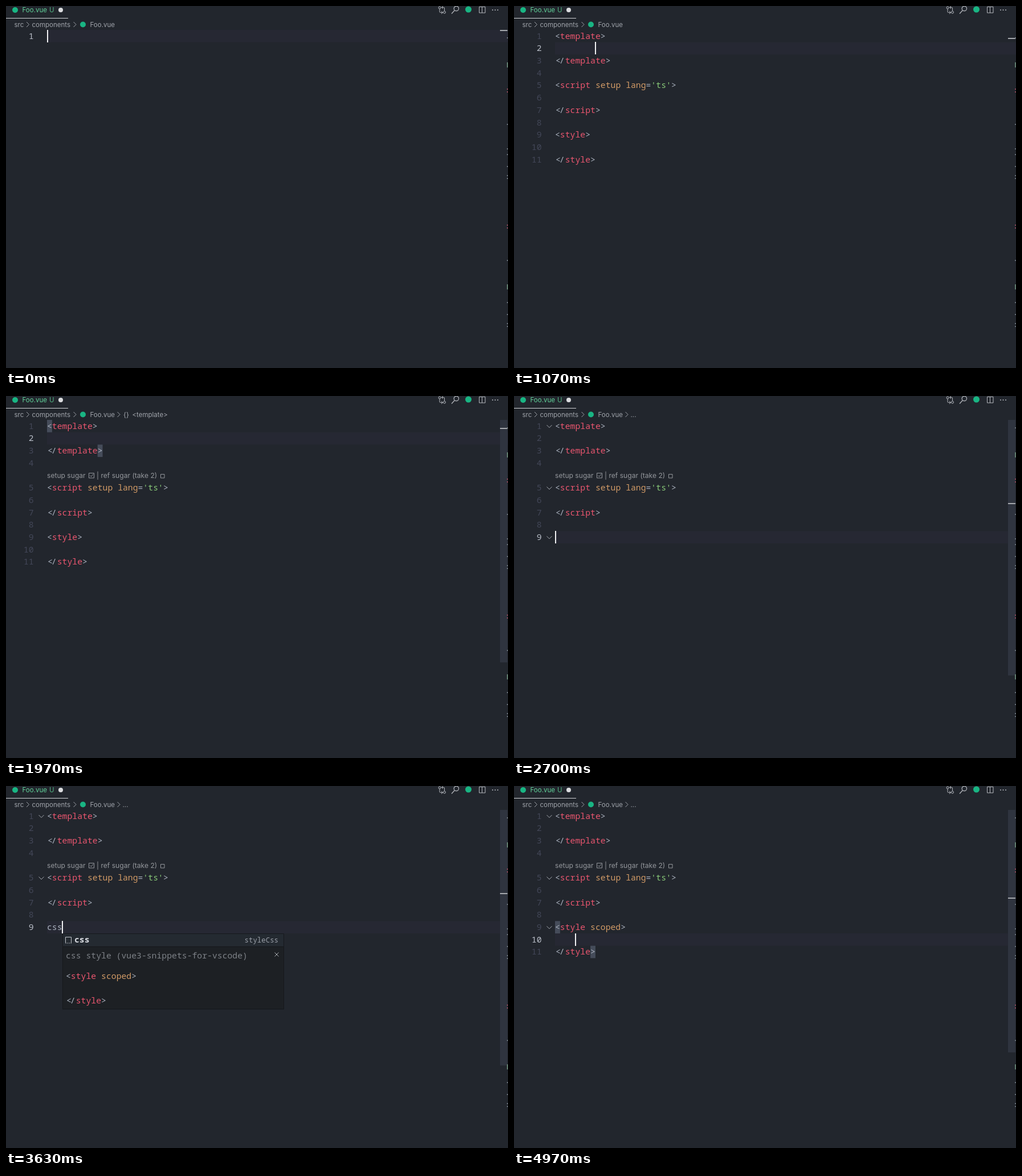
An HTML page with a canvas for the animation above (5.01 s loop, 881 by 636 pixels).

```html
<!DOCTYPE html>
<html lang="en">
<head>
<meta charset="utf-8">
<title>Editor snippets</title>
<style>
html, body { margin: 0; width: 100%; height: 100%; overflow: hidden; background: #22262d; }
canvas { display: block; }
</style>
</head>
<body>
<canvas id="stage" width="881" height="636"></canvas>
<script>
const ctx = document.getElementById('stage').getContext('2d');
const LOOP = 5010, LEFT = 72, TOP = 42, ROW = 21.7, CHAR = 8.868;
const MONO = '"Noto Sans Mono", "Noto Sans CJK SC", "Noto Sans CJK", monospace';
const UI = 'Inter, sans-serif';
const code = '14.78px ' + MONO, bold = 'bold ' + code;
const FG = '#abb2bf', RED = '#ea566f', ORANGE = '#d19a66', GREEN = '#89ca78', VUE = '#19b583';
const ICON = '#b4b7bd';

const head = ['<template>', '', '</template>', '', "<script setup lang='ts'>", '', '<\/script>', ''];
const file = [...head, '<style>', '', '</style>'];
const scoped = [...head, '<style scoped>', '', '</style>'];

// Notes are [x offset, text, row].
const initPopup = {
  items: ['vueinit'], match: 0, label: 'vinit',
  notes: [[0, 'vue模版初始化(默认setup语法糖和ts)', 0], [274, '(vue3-sni', 0], [0, 'ppets-for-vscode)', 1]],
  body: file
};
const listPopup = {
  items: 'c canvas cap caption cc:ie cc:noie center cite cmd code col colg'.split(' '), match: 1
};
const cssPopup = {
  items: ['css'], match: 3, label: 'styleCss',
  notes: [[0, 'css style (vue3-snippets-for-vscode)', 0]],
  body: scoped.slice(8)
};

// Each step changes some of the editor's state from its time on.
const steps = [
  [0, { lines: [''], row: 1, col: 0, mark: 43, brackets: [], folds: [] }],
  [280, { lines: ['v'], col: 1 }],
  [450, { lines: ['vu'], col: 2, popup: initPopup }],
  [980, { lines: file, row: 2, col: 8, mark: 57, popup: null }],
  [1300, { brackets: [[1, 0], [3, 10]] }],
  [1700, { lens: true, crumb: '<template>', slider: 468 }],
  [2250, { folds: [1, 5, 9] }],
  [2600, { lines: [...head, ''], row: 9, col: 0, mark: 189, brackets: [], crumb: '...', slider: 491 }],
  [3100, { lines: [...head, 'c'], col: 1, popup: listPopup }],
  [3380, { lines: [...head, 'cs'], col: 2, popup: { ...cssPopup, match: 2 } }],
  [3560, { lines: [...head, 'css'], col: 3, folds: [1, 5], popup: cssPopup }],
  [4520, { lines: scoped, row: 10, col: 4, mark: 197, slider: 468, popup: null }],
  [4850, { brackets: [[9, 0], [11, 7]], folds: [1, 5, 9] }]
];

function stateAt(t) {
  const s = {};
  for (const [start, patch] of steps) {
    if (start > t) break;
    Object.assign(s, patch);
    if ('col' in patch) s.moved = start;
  }
  return s;
}

function rect(x, y, w, h, color) {
  ctx.fillStyle = color;
  ctx.fillRect(x, y, w, h);
}

function text(str, x, y, color, font = code, align = 'left') {
  ctx.font = font;
  ctx.textAlign = align;
  ctx.fillStyle = color;
  ctx.fillText(str, x, y);
}

function dot(x, y, r, color) {
  ctx.fillStyle = color;
  ctx.beginPath();
  ctx.arc(x, y, r, 0, 7);
  ctx.fill();
}

function stroke(path, color = ICON, width = 1) {
  ctx.strokeStyle = color;
  ctx.lineWidth = width;
  ctx.stroke(new Path2D(path));
}

function drawCode(line, x, y) {
  const isTag = line[0] === '<';
  const tokens = line.match(/<\/?|>|'[^']*'|=|\w+|\s+/g) || [];
  let col = 0;
  tokens.forEach((token, i) => {
    const at = x + col * CHAR;
    if (token === '</') {
      text('<', at + 1, y, FG);
      text('/', at + CHAR - 1, y, FG);
    } else {
      let color = FG;
      if (token[0] === "'") color = GREEN;
      else if (isTag && /\w/.test(token)) color = i === 1 ? RED : ORANGE;
      text(token, at, y, color);
    }
    col += token.length;
  });
}

function drawHeader(s) {
  const font = '11.5px ' + UI, gray = '#a0a4ab';
  dot(16, 7, 5, VUE);
  text('Foo.vue', 28.5, 11, '#62d29a', font);
  text('U', 76, 11, '#54b584', font);
  dot(96, 7, 4, '#dcdde0');
  rect(0, 21, 109, 1, '#d0d2d5');

  text('src', 14.5, 37, gray, font);
  text('components', 45.5, 37, gray, font);
  dot(135, 32.5, 5, VUE);
  text('Foo.vue', 147.5, 37, gray, font);
  const arrows = s.crumb ? [36, 118.5, 195.5] : [36, 118.5];
  for (const x of arrows) stroke(`M${x} 28l4.5 4.5l-4.5 4.5`, gray);
  if (s.crumb === '...') text('...', 204.5, 37, gray, font);
  else if (s.crumb) {
    text('{}', 206, 37, gray, font);
    text(s.crumb, 221.5, 37, gray, font);
  }

  // Compare, search, split and more
  stroke('M761 5v5q0 1.5 1.5 1.5h4M764 9l2.5 2.5l-2.5 2.5M769.5 9v-5q0-1.5-1.5-1.5h-3.5M767 0l-2.5 2.5l2.5 2.5');
  stroke('M763 3a2 2 0 1 1-4 0a2 2 0 1 1 4 0M771.5 11a2 2 0 1 1-4 0a2 2 0 1 1 4 0');
  stroke('M794.5 4.5a4.2 4.2 0 1 1-8.4 0a4.2 4.2 0 1 1 8.4 0M787 8l-5 5.5', ICON, 1.2);
  dot(811.5, 6, 5.5, VUE);
  stroke('M830.5 1.5h10.5v10.5h-10.5zM835.5 1.5v10.5');
  for (const x of [854, 858.5, 863]) dot(x, 7, 1, ICON);
}

function drawEdge(s) {
  if (s.slider) rect(867, TOP, 13, s.slider - TOP, '#2f343f');
  rect(867, s.mark - 1, 13, 2, '#a5a8ad');
  for (const y of [55, 207, 250, 260, 281, 297, 302, 446, 520, 541, 557, 562]) rect(879, y, 2, 2, '#687078');
  for (const y of [99, 489]) rect(879, y, 2, 9, '#5f7a6c');
  for (const y of [145, 150, 384, 389]) rect(879, y, 2, 2, '#8b4757');
}

function drawEditor(s, t) {
  const lineTop = n => TOP + ROW * (n - 1 + (s.lens && n > 4 ? 1 : 0));
  const rowY = lineTop(s.row);
  rect(LEFT, rowY, 809, ROW, '#262833');
  for (const [n, col] of s.brackets) rect(LEFT + col * CHAR, lineTop(n), CHAR, ROW, '#454c5a');

  s.lines.forEach((line, i) => {
    const n = i + 1, y = lineTop(n) + 15.6;
    text(n, 48.5, y, n === s.row ? '#b9bec8' : '#434758', code, 'right');
    drawCode(line, LEFT, y);
  });
  for (const n of s.folds) stroke(`M57.5 ${lineTop(n) + 9}l4.5 4.5l4.5-4.5`, '#a4a8af');

  if (s.lens) {
    const font = '12.1px ' + UI, gray = '#94979c';
    text('setup sugar', LEFT, 144, gray, font);
    stroke('M145.5 135.5h9v8.5h-9zM147.5 139.5l2 2.2l3.5-4.5', gray);
    text('| ref sugar (take 2)', 159, 144, gray, font);
    stroke('M271.5 137.5h6.5v6.5h-6.5z', gray);
  }

  drawEdge(s);
  const x = LEFT + s.col * CHAR;
  if (s.popup) drawPopup(s.popup, Math.round(x), Math.round(rowY + ROW) + 1);
  if ((t - s.moved) % 1000 < 500) rect(Math.floor(x), Math.floor(rowY), 2, 22, '#f0f1f3');
}

function drawPopup(p, x, y) {
  const width = 389;
  const bodyY = p.notes && y + 79 + p.notes.at(-1)[2] * ROW;
  const height = p.notes ? bodyY + (p.body.length - 1) * ROW + 10 - y : p.items.length * ROW + 2;
  rect(x, y, width, height, '#1d2024');
  rect(x, y, width, ROW, '#242a31');

  p.items.forEach((item, i) => {
    const top = y + i * ROW, base = top + 15.2;
    const ix = x + 5.5, iy = Math.round(top + 5) + .5;
    stroke(`M${ix} ${iy + 10}v-10h10v10`, '#c3c6cb');
    ctx.setLineDash([1.5, 1.5]);
    stroke(`M${ix} ${iy + 10.5}h10.5`, '#c3c6cb');
    ctx.setLineDash([]);
    text(item.slice(0, p.match), x + 21, base, '#d7dae0', bold);
    text(item.slice(p.match), x + 21 + p.match * CHAR, base, i ? FG : '#d2d6de');
  });

  if (p.notes) {
    rect(x, y + 22, width, 1, '#15171b');
    text(p.label, x + 379, y + 14.5, '#9a9fa8', '12.4px ' + MONO, 'right');
    for (const [dx, str, row] of p.notes) text(str, x + 6 + dx, y + 43 + row * ROW, '#7d8187');
    stroke(`M${x + 372.5} ${y + 32.5}l7 7m0-7l-7 7`, '#aeb1b6');
    p.body.forEach((line, i) => drawCode(line, x + 6, bodyY + i * ROW));
  }
  stroke(`M${x + .5} ${y - .5}h${width - 1}v${height}h${1 - width}z`, '#16181c');
}

function frame(now) {
  const t = now % LOOP, s = stateAt(t);
  rect(0, 0, 881, 636, '#22262d');
  drawHeader(s);
  drawEditor(s, t);
  requestAnimationFrame(frame);
}
requestAnimationFrame(frame);
</script>
</body>
</html>
```
